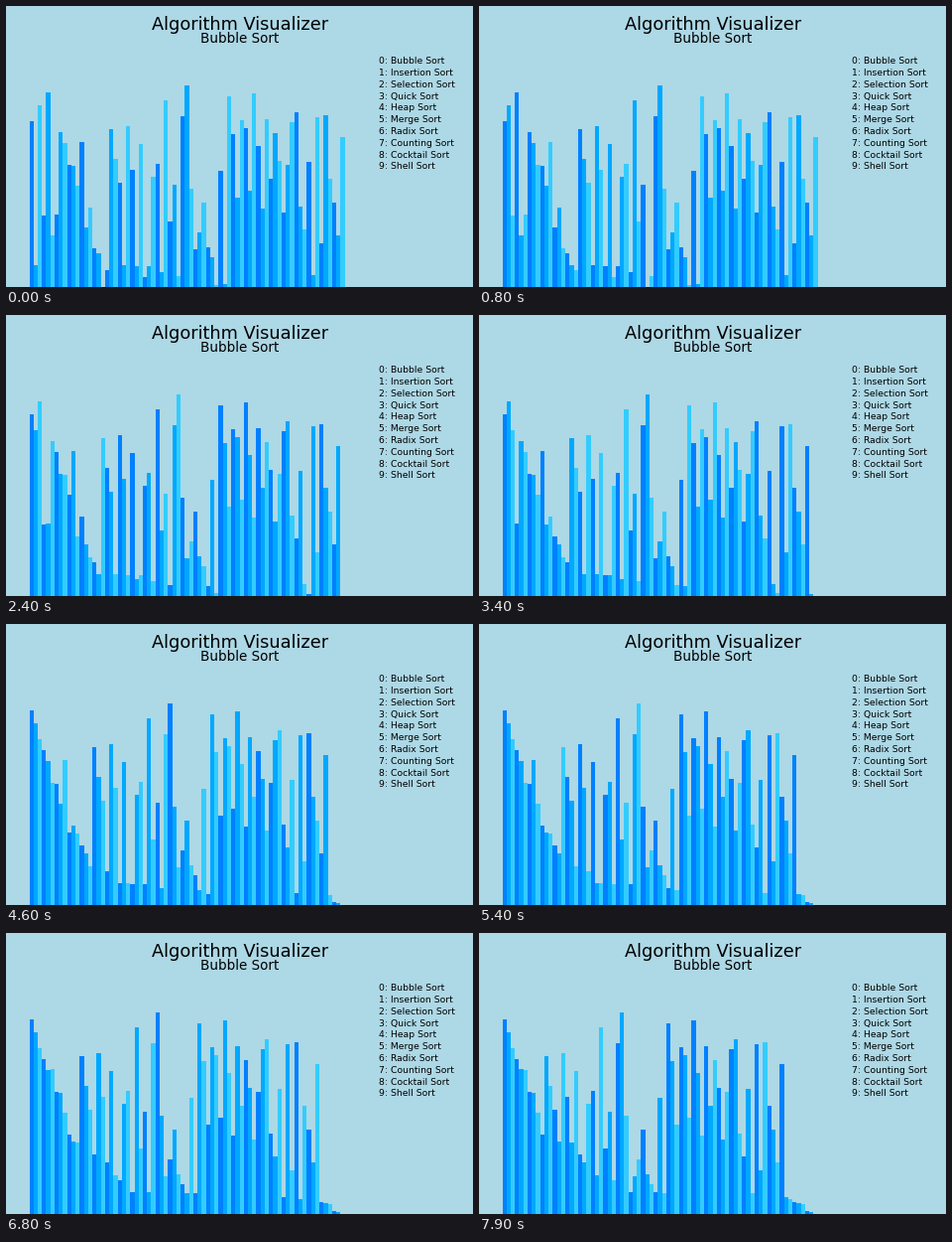
Write a matplotlib script that moves like this. It is 471 px wide and 283 px high and loops after 8000 ms.

```python
import matplotlib.pyplot as plt
import numpy as np
from matplotlib.animation import FuncAnimation

W, H, DPI = 471, 283, 64
FRAMES, STEP = 80, 100
BACKGROUND = "#add8e6"
SHADES = ["#0080ff", "#00a8ff", "#33ccff"]
LEFT, BAR = 23.5, 4.24

# Top edge of every bar before sorting, in pixels from the top.
TOPS = [
    116, 260.8, 100, 211, 87, 231, 210, 127, 138, 160, 161, 181, 137, 223, 203,
    244, 249, 283, 266, 124, 154, 178, 261.3, 121, 165, 262.3, 139, 272.8, 261.8, 172,
    159, 268, 95, 217, 180, 271.8, 111, 80, 184, 245, 228, 198, 243, 253, 281,
    166, 280, 91, 129, 193, 115, 123, 186, 88, 141, 204, 114, 174, 128, 156,
    208, 160, 117, 107, 202, 225, 157, 270.8, 112, 239, 110, 174, 198, 231, 132,
]

# Pace of the sort: comparisons finished at a given time in ms.
PACE_MS = [300, 400, 1200, 1500, 3400, 4600, 5400, 6800, 7900]
PACE_N = [0, 6, 61, 75, 212, 293, 362, 493, 594]

MENU = ["Bubble", "Insertion", "Selection", "Quick", "Heap",
        "Merge", "Radix", "Counting", "Cocktail", "Shell"]


def bubble_states(tops, limit):
    """Return the bar order after each comparison, tallest bars first."""
    tops = list(tops)
    states = [tuple(tops)]
    for last in range(len(tops) - 1, 0, -1):
        for j in range(last):
            if tops[j] > tops[j + 1]:
                tops[j], tops[j + 1] = tops[j + 1], tops[j]
            states.append(tuple(tops))
            if len(states) > limit:
                return states
    return states


def label(x, y, text, px, align="center"):
    ax.text(x, y, text, fontsize=px * 72 / DPI, family="DejaVu Sans",
            color="black", ha=align, va="baseline")


states = bubble_states(TOPS, PACE_N[-1])

fig = plt.figure(figsize=(W / DPI, H / DPI), dpi=DPI, facecolor=BACKGROUND)
ax = fig.add_axes([0, 0, 1, 1])
ax.set_xlim(0, W)
ax.set_ylim(H, 0)
ax.axis("off")

label(236, 23.5, "Algorithm Visualizer", 17.8)
label(235.5, 37, "Bubble Sort", 13.5)
for i, name in enumerate(MENU):
    label(376.4, 58.3 + 11.78 * i, f"{i}: {name} Sort", 9.2, "left")

count = len(TOPS)
bars = ax.bar(LEFT + BAR * np.arange(count), [0] * count, width=BAR, bottom=H,
              align="edge", linewidth=0,
              color=[SHADES[i % 3] for i in range(count)])
ax.set_xlim(0, W)
ax.set_ylim(H, 0)


def draw(frame):
    done = int(round(np.interp(frame * STEP, PACE_MS, PACE_N)))
    for bar, top in zip(bars, states[done]):
        bar.set_y(top)
        bar.set_height(H - top)
    return list(bars)


anim = FuncAnimation(fig, draw, frames=FRAMES, interval=STEP,
                     init_func=lambda: draw(0), repeat=True, repeat_delay=0)
plt.show()
```
